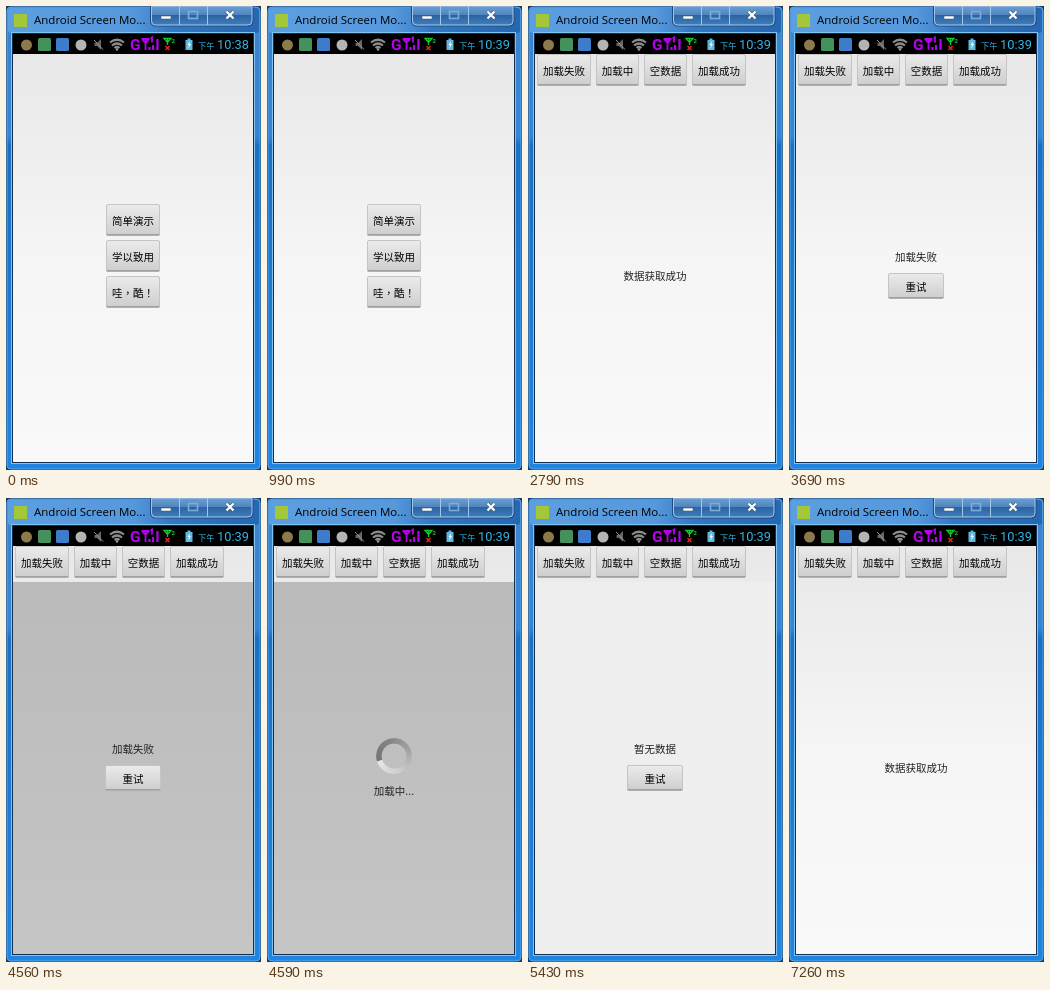
Animation, 255 px wide and 464 px high, one loop 8000 ms. Source, as an HTML page:

```html
<!DOCTYPE html>
<html lang="zh-Hans">
<head>
<meta charset="utf-8">
<title>Android Screen Monitor</title>
<style>
html, body { margin: 0; width: 100%; height: 100%; overflow: hidden; }
svg { position: absolute; left: 0; top: 0; display: block; }
text { font: 10.5px "Noto Sans CJK SC", "Noto Sans CJK", sans-serif; fill: #222; }
.mid { text-anchor: middle; }
.btn text { fill: #000; font-weight: 500; text-anchor: middle; }
.mark { font-family: "Noto Sans CJK TC", "Noto Sans CJK", sans-serif; }
.title { font: 11.5px "Open Sans", sans-serif; fill: #000; }
.clock { font: 12.8px Roboto, sans-serif; fill: #33b5e5; }
.ampm { font-size: 8.2px; fill: #33b5e5; }
.ring {
  position: absolute; left: 109px; top: 240px; width: 36px; height: 36px; border-radius: 50%;
  background: conic-gradient(from 254deg, #747474, #858585 25%, #a5a5a5 50%, #cecece 75%, #e6e6e6 99%, #747474);
  mask: radial-gradient(circle, transparent 12px, #000 12.8px);
  -webkit-mask: radial-gradient(circle, transparent 12px, #000 12.8px);
}
.show { visibility: hidden; animation: 8s step-end infinite; }
.before { animation-name: before; }
.after { animation-name: after; }
.menu { animation-name: menu; }
.tabs { animation-name: tabs; }
.done { animation-name: done; }
.fail { animation-name: fail; }
.load { animation-name: load; }
.empty { animation-name: empty; }
.retry { animation-name: retry; }
.panel { animation-name: panel; }
.shade { animation-name: shade; }
@keyframes before { 0% { visibility: visible } 12.375%, 100% { visibility: hidden } }
@keyframes after { 0% { visibility: hidden } 12.375%, 100% { visibility: visible } }
@keyframes menu { 0% { visibility: visible } 34.875%, 100% { visibility: hidden } }
@keyframes tabs { 0% { visibility: hidden } 34.875%, 100% { visibility: visible } }
@keyframes done {
  0%, 46.125% { visibility: hidden }
  34.875%, 90.75%, 100% { visibility: visible }
}
@keyframes fail { 0%, 57.375%, 100% { visibility: hidden } 46.125% { visibility: visible } }
@keyframes load { 0%, 67.875%, 100% { visibility: hidden } 57.375% { visibility: visible } }
@keyframes empty { 0%, 90.75%, 100% { visibility: hidden } 67.875% { visibility: visible } }
@keyframes retry {
  0%, 57.375%, 90.75%, 100% { visibility: hidden }
  46.125%, 67.875% { visibility: visible }
}
@keyframes panel {
  0%, 57%, 90.75%, 100% { visibility: hidden }
  46.5%, 67.875% { visibility: visible }
}
@keyframes shade { 0%, 67.875%, 100% { visibility: hidden } 57% { visibility: visible } }
</style>
</head>
<body>
<svg id="stage" width="255" height="464" viewBox="0 0 255 464">
  <defs>
    <linearGradient id="frame" x2="0" y2="1">
      <stop offset="0" stop-color="#3d85cc"/><stop offset=".28" stop-color="#3585d6"/>
      <stop offset=".3" stop-color="#1a70c4"/><stop offset="1" stop-color="#2085e2"/>
    </linearGradient>
    <linearGradient id="bar">
      <stop offset="0" stop-color="#5c9fe0"/><stop offset=".5" stop-color="#5698dc"/>
      <stop offset=".65" stop-color="#3378c2"/><stop offset="1" stop-color="#2567b0"/>
    </linearGradient>
    <linearGradient id="page" x2="0" y2="1">
      <stop offset="0" stop-color="#e8e8e8"/><stop offset=".5" stop-color="#f5f5f5"/>
      <stop offset="1" stop-color="#f9f9f9"/>
    </linearGradient>
    <linearGradient id="dim" x2="0" y2="1">
      <stop offset="0" stop-color="#bababa"/><stop offset="1" stop-color="#c5c5c5"/>
    </linearGradient>
    <linearGradient id="key" x2="0" y2="1">
      <stop offset="0" stop-color="#ebebeb"/><stop offset="1" stop-color="#cecece"/>
    </linearGradient>
    <linearGradient id="glass" x2="0" y2="1">
      <stop offset="0" stop-color="#6f9fd0"/><stop offset=".48" stop-color="#4d84bf"/>
      <stop offset=".5" stop-color="#2c64a2"/><stop offset="1" stop-color="#3f7dbd"/>
    </linearGradient>
  </defs>

  <!-- window -->
  <rect width="255" height="464" fill="#1a3d66"/>
  <rect x="1" y="1" width="253" height="462" rx="4" fill="url(#frame)" stroke="#5aa8e8"/>
  <rect x="2" y="2" width="251" height="25" rx="3" fill="url(#bar)"/>
  <rect x="5.5" y="26.5" width="243" height="431" fill="none" stroke="#7fc4f2"/>
  <rect x="6" y="27" width="242" height="430" fill="#15304f"/>
  <rect x="8" y="8" width="13" height="13" fill="#a4c639"/>
  <text class="title" x="28" y="18">Android Screen Mo...</text>
  <path d="M144.500 0V15q0 5 5 5H242q5 0 5-5V0" fill="none" stroke="#1f4a7c"/>
  <path d="M145.500 0V15q0 4 4 4H242q4 0 4-4V0Z" fill="url(#glass)" stroke="#a3c6e8"/>
  <path d="M173.500 0V19M201.500 0V19" stroke="#a3c6e8"/>
  <rect x="155" y="10" width="10" height="3" fill="#fff" stroke="#40617f" stroke-width=".6"/>
  <rect x="182.500" y="5.500" width="9" height="7" fill="none" stroke="#7fabd8" stroke-width="1.600"/>
  <path d="M220.500 5.500l7 7m0-7l-7 7" stroke="#40617f" stroke-width="3.400"/>
  <path d="M220.500 5.500l7 7m0-7l-7 7" stroke="#fff" stroke-width="2.200"/>

  <!-- status bar -->
  <rect x="7" y="28" width="240" height="20" fill="#000"/>
  <circle cx="20.500" cy="39" r="5.500" fill="#8c7a4a"/>
  <rect x="32" y="32" width="13" height="13" rx="1.500" fill="#45915b"/>
  <rect x="50" y="32" width="13" height="13" rx="1.500" fill="#3c7cca"/>
  <circle cx="75" cy="39" r="5.500" fill="#b4b4b4"/>
  <path d="M88.500 37h2.500l4-4v11l-4-4h-2.500Z" fill="#666"/>
  <path d="M88 34l9 9.500" stroke="#999"/>
  <g fill="none" stroke="#8c8c8c" stroke-width="2.200">
    <path d="M104 36.500q7-5.500 14 0M106 39.500q5-4 10 0M108.500 42q2.500-2 5 0"/>
  </g>
  <circle cx="111" cy="43.500" r="1.200" fill="#999"/>
  <text x="124" y="44" style="font:bold 15.5px Roboto,sans-serif;fill:#b800f0">G</text>
  <g fill="none" stroke="#b800f0" stroke-width="1.800">
    <path d="M136 33l3.500 4 3.500-4M135.500 33h8M139.500 33v11M144.500 32.500l1.500-1v5"/>
    <path d="M143.500 44v-3M147 44v-5M151.500 44v-11" stroke-width="2.200"/>
  </g>
  <path d="M158 32.500h7l-3.500 4ZM161.500 33v6" fill="none" stroke="#10c830" stroke-width="1.300"/>
  <text x="165.500" y="36.500" style="font:bold 6px Roboto,sans-serif;fill:#10c830">2</text>
  <path d="M159.500 40l4 4m0-4l-4 4" stroke="#e22" stroke-width="1.500"/>
  <path d="M179.500 34h2v-1.500h3V34h2v10h-7Z" fill="#5cb9e2"/>
  <path d="M184 35l-2.500 4h1.500l-1 4 3-5h-1.500Z" fill="#fff"/>
  <text class="ampm" x="192" y="42.500">下午</text>
  <text class="clock show before" x="211" y="43">10:38</text>
  <text class="clock show after" x="211" y="43">10:39</text>

  <!-- app -->
  <rect x="7" y="48" width="240" height="408" fill="url(#page)"/>
  <rect class="show panel" x="7" y="84" width="240" height="372" fill="#eee"/>
  <rect class="show shade" x="7" y="84" width="240" height="372" fill="url(#dim)"/>
  <g id="menu" class="show menu"></g>
  <g id="tabs" class="show tabs"></g>
  <g id="retry" class="show retry"></g>
  <text class="mid show done" x="127" y="274">数据获取成功</text>
  <text class="mid show fail" x="127" y="255">加载失败</text>
  <text class="mid show empty" x="127" y="255">暂无数据</text>
  <text class="mid show load" x="127" y="296.500">加载中...</text>
</svg>
<div class="ring show load"></div>
<script>
function button(group, label, x, y, w, h) {
  // Full-width punctuation sits centred in its cell.
  const text = label.replace(/[，！]/g, '<tspan class="mark" lang="zh-Hant">$&</tspan>');
  document.getElementById(group).insertAdjacentHTML('beforeend', `<g class="btn">
    <rect x="${x}" y="${y + 1}" width="${w}" height="${h}" rx="2" fill="#b0b0b0"/>
    <rect x="${x + .5}" y="${y + .5}" width="${w - 1}" height="${h - 1}" rx="1.5" fill="url(#key)" stroke="#c4c4c4"/>
    <path d="M${x + 1} ${y + h - .5}h${w - 2}" stroke="#a0a0a0"/>
    <text x="${x + w / 2}" y="${y + h / 2 + 5}">${text}</text></g>`);
}
['简单演示', '学以致用', '哇，酷！'].forEach((s, i) => button('menu', s, 100, 198 + 36 * i, 54, 31));
let x = 9;
for (const s of ['加载失败', '加载中', '空数据', '加载成功']) {
  const w = s.length * 11 + 10;
  button('tabs', s, x, 48, w, 31);
  x += w + 5;
}
button('retry', '重试', 99, 267, 56, 25);
</script>
</body>
</html>
```
